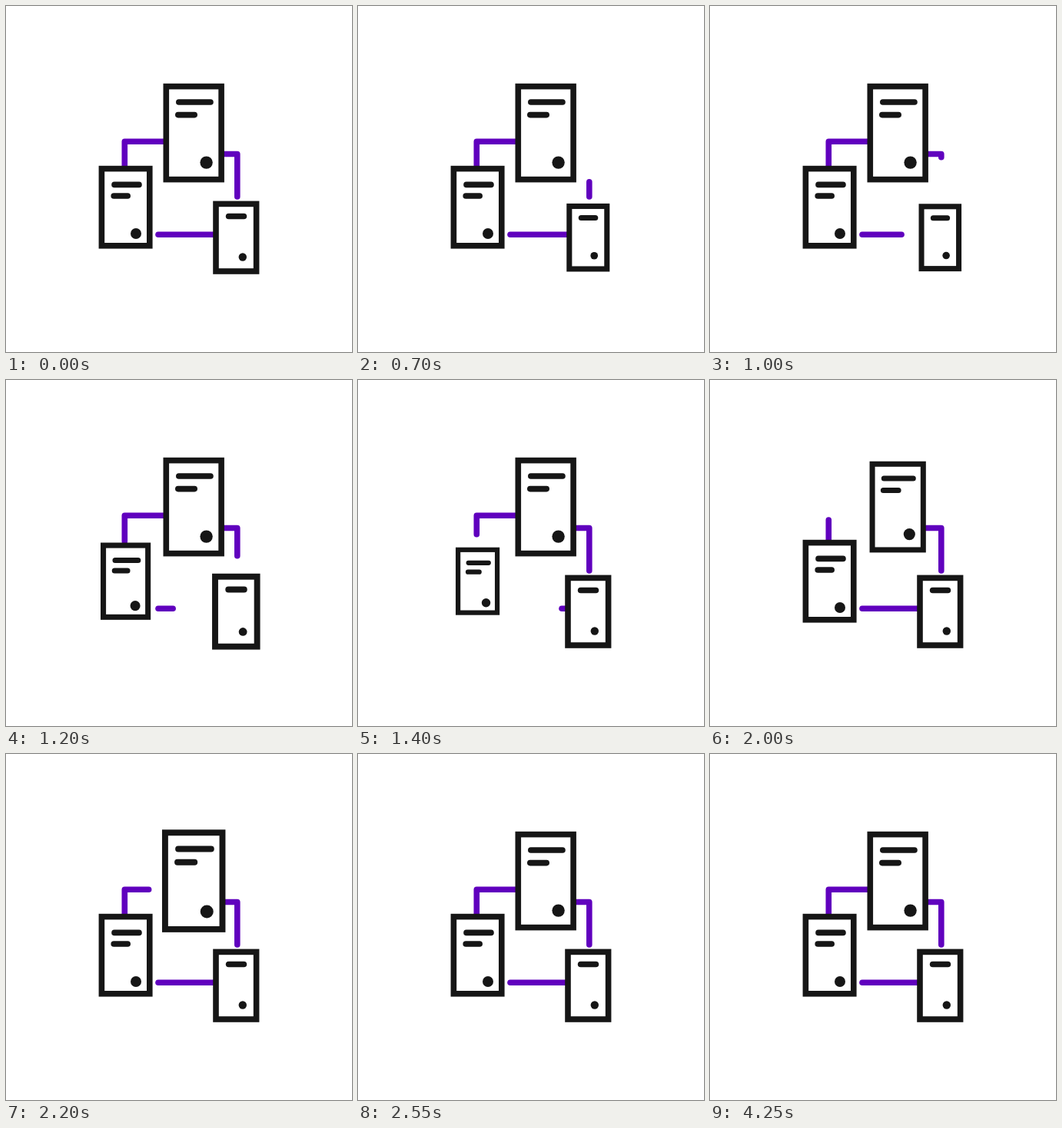
Write an HTML page that moves like this. It is 450 px wide and 450 px high and loops after 5 s.

```html
<!DOCTYPE html>
<html lang="en">
<head>
<meta charset="utf-8">
<title>Linked servers</title>
<style>
  html, body { margin: 0; width: 100%; height: 100%; overflow: hidden; background: #fff; }
  svg { display: block; width: 100vw; height: 100vh; }
  .link { fill: none; stroke: #6000be; stroke-width: 7.6; stroke-linecap: round; stroke-linejoin: round; stroke-dasharray: 1 2; }
  .server { stroke: #161616; stroke-linecap: round; stroke-width: 7.6; transform-box: fill-box; transform-origin: center; }
  .server rect { fill: #fff; }
  .server circle { fill: #161616; stroke: none; }
</style>
</head>
<body>
<svg viewBox="0 0 450 450">
  <path class="link" pathLength="1" d="M281 192.5H300.8V248"/>
  <path class="link" pathLength="1" d="M273 297.2H198"/>
  <path class="link" pathLength="1" d="M154.3 210V176.2H208"/>

  <g class="server">
    <rect x="273" y="257.4" width="52.6" height="87.6"/>
    <path d="M289.6 273.5H309.4"/>
    <circle cx="307.8" cy="326.5" r="5.2"/>
  </g>
  <g class="server">
    <rect x="124.4" y="211.6" width="62.4" height="100.2"/>
    <path d="M141 232.4H173M140.2 247H158.2"/>
    <circle cx="169" cy="296" r="7"/>
  </g>
  <g class="server">
    <rect x="208.3" y="104.6" width="71.8" height="121"/>
    <path d="M224.8 125H266M223.8 141.6H245.2"/>
    <circle cx="260.6" cy="203.6" r="8.2"/>
  </g>
</svg>
<script>
  const LOOP = 5000, STEP = 50, TRAVEL = 470;
  const FIRST_TURN = 850, TURN_GAP = 500;
  const SMALL = 0.8, BIG = 1.045;

  const links = document.querySelectorAll('.link');
  const servers = document.querySelectorAll('.server');

  const clamp = x => Math.min(1, Math.max(0, x));
  const ease = x => (1 - Math.cos(Math.PI * clamp(x))) / 2;
  const mix = (a, b, x) => a + (b - a) * x;

  // Time is relative to the turn, when a server is smallest and its link is gone.
  function serverScale(t) {
    if (t < 0) return mix(1, SMALL, ease((t + 250) / 250));
    if (t < 300) return mix(SMALL, BIG, ease(t / 300));
    return mix(BIG, 1, ease((t - 300) / 200));
  }

  function drawLink(link, t) {
    const erased = clamp((t + 500) / TRAVEL);
    const drawn = clamp(t / TRAVEL);
    const empty = t < 0 ? erased === 1 : drawn === 0;
    link.style.visibility = empty ? 'hidden' : 'visible';
    link.style.strokeDashoffset = t < 0 ? -erased : 1 - drawn;
  }

  function render(now) {
    const time = Math.floor((now % LOOP) / STEP) * STEP;
    servers.forEach((server, i) => {
      const t = time - FIRST_TURN - i * TURN_GAP;
      server.style.transform = `scale(${serverScale(t)})`;
      drawLink(links[i], t);
    });
  }

  const start = performance.now();
  function tick() {
    render(performance.now() - start);
    requestAnimationFrame(tick);
  }
  tick();
</script>
</body>
</html>
```
